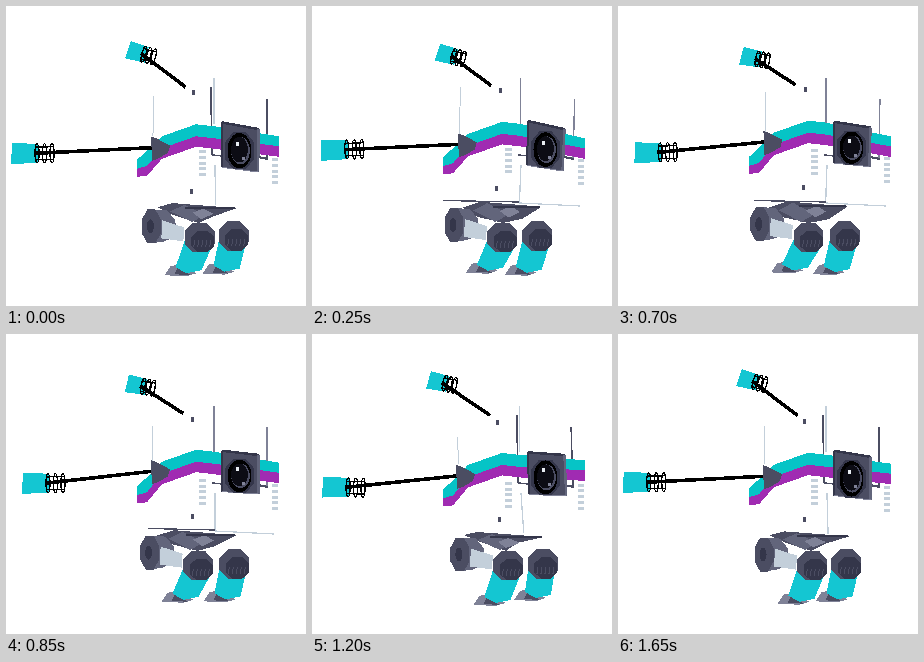
An HTML page for the animation above (1700 ms loop, 300 by 300 pixels).

```html
<!DOCTYPE html>
<html lang="en">
<head>
<meta charset="utf-8">
<title>Walking robot</title>
<style>
html, body { margin: 0; width: 100%; height: 100%; overflow: hidden; background: #fff; }
svg { display: block; width: 100vw; height: 100vh; }
</style>
</head>
<body>
<svg id="stage" viewBox="0 0 300 300" shape-rendering="crispEdges"></svg>
<script>
const LOOP = 1700, STEP = 50;
const CYAN = '#14c6d2', TEAL = '#06c4c6', PURPLE = '#a02bb2', BLACK = '#000';
const DARK = '#34364a', SLATE = '#4b4d62', MID = '#62657b', GREY = '#7f8297', PALE = '#c3cfda';
const stage = document.getElementById('stage');

// The whole robot follows two slow swings; tilt tells how far its underside shows.
let lean = 0, turn = 0, tilt = 0;
const swing = (base, byLean, byTurn = 0) => base + byLean * lean + byTurn * turn;

const shift = (x, y, pts) => pts.map(([a, b]) => [x + a, y + b]);
const poly = (fill, ...pts) => `<polygon fill="${fill}" points="${pts.map(p => p.map(n => n.toFixed(2))).join(' ')}"/>`;
const line = (color, width, a, b) => `<path d="M${a}L${b}" stroke="${color}" stroke-width="${width}"/>`;
const oval = (fill, x, y, rx, ry, more = '') => `<ellipse fill="${fill}" cx="${x}" cy="${y}" rx="${rx}" ry="${ry}" ${more}/>`;
const box = (fill, x, y, w, h) => `<rect fill="${fill}" x="${x}" y="${y}" width="${w}" height="${h}"/>`;

function octagon(fill, x, y, rx, ry) {
  const pts = [];
  for (let i = 0; i < 8; i++) {
    const a = (i + 0.5) * Math.PI / 4;
    pts.push([x + rx * 1.08 * Math.cos(a), y + ry * 1.08 * Math.sin(a)]);
  }
  return poly(fill, ...pts);
}

function arm(x, y, shoulder, angle, back, front, half, gap) {
  let claw = '';
  for (let i = 0; i < 3; i++)
    claw += oval('none', 3 + i * gap, 0, 2, half - 1, `stroke="${BLACK}" stroke-width="1.4"`);
  for (const y of [-0.6, 0.6])
    claw += line(BLACK, 1.2, [1, y * half], [5 + 2 * gap, y * half]);
  return `<g transform="translate(${x} ${y}) rotate(${angle})">`
    + poly(CYAN, [back + 1, -half], [front, 1 - half], [front, half - 1], [back, half]) + claw + '</g>'
    + line(BLACK, 3.6, [x, y], shoulder);
}

function arms() {
  const x = swing(146, 1), y = swing(139.5, -2.5, -2.5);
  return arm(swing(33.5, 0.5, 5.7), swing(148.3, -5.2, 0.5), [x, y], swing(-0.5, -1.5), -23, 4, 10.5, 7.5)
    + arm(swing(134.5, 4.8), swing(49.6, 1, 2.4), [swing(178.5, 0.3, -1.2), swing(80.3, -1.2, -1)],
      swing(13, 1, -2.5), -14, 6, 9, 5)
    + poly(SLATE, ...shift(x, y, [[-1, -11], [5, -9], [18, -2], [16, 5], [6, 11], [0, 13]]));
}

function stripes() {
  const left = swing(153, -2.5, -1), bend = swing(129, -2, -1.5), peak = swing(117, -2, -1.5), right = swing(129.5, 3.2, -0.5);
  const edge = (l, flat, drop, r) => [[131, left + l], [141, left + l - flat], [156, bend + drop],
    [190, peak + drop], [208, peak + drop + 2], [273, right + r]];
  const top = edge(0, 9, 0, 0), mid = edge(9, 3, 12, 10), low = edge(17, 1, 22.5, 20.5);
  return poly(TEAL, ...top, ...[...mid].reverse()) + poly(PURPLE, ...mid, ...low.reverse());
}

function shell() {
  const under = tilt > 0.4;
  const x = swing(208, 0.5), sideX = swing(261, 2), cornerX = swing(209.3, -2.5, -0.5), cornerY = swing(198, -1, -1.5);
  let out = line(PALE, 1, [swing(147, 2), swing(91, -12)], [147, 130])
    + line(under ? GREY : PALE, under ? 1.8 : 1.2, [x, 72], [x, 118])
    + line(PALE, 1.3, [209, 159], [cornerX, cornerY])
    + line(under ? GREY : SLATE, 1.4, [sideX, 93], [261, 152])
    + box(SLATE, swing(185.5, 1.5), swing(83.5, -2.5, -1), 3, 5)
    + box(SLATE, swing(184.5, -1.5), swing(181.5, -2, -1.5), 3, 5);
  if (under) out += line(SLATE, 1.3, [swing(141, -12), 194.5], [cornerX, 196]) + line(PALE, 1.2, [cornerX, 197], [268, 200]);
  else out += line(SLATE, 1.8, [205, 81], [206, 149]);
  for (let i = 0; i < 5; i++)
    out += box(PALE, 193, swing(144.5, -3.5) + i * 5.7, 7, 3) + box(PALE, 266, swing(151.2, 1.5, -1) + i * 5.7, 6, 3);
  return out;
}

function eye() {
  const tl = [216, swing(116.6, -1.8)], tr = [252.5, swing(122, 1, -1)];
  const br = [swing(252.3, -2), swing(163, 1, -3)], bl = [swing(216, -1), swing(159.5, -1, -2)];
  const x = 233.5, y = (tl[1] + tr[1] + br[1] + bl[1]) / 4 + 3, ry = swing(17, 0, -0.8);
  return line(SLATE, 1.5, [206, 149], [216, 150]) + line(SLATE, 2, [252, 151], [262, 153])
    + poly(SLATE, tl, tr, br, bl)
    + line(DARK, 2.5, tl, tr) + line(DARK, 2, tl, bl) + line(MID, 2.5, tr, br) + line(GREY, 1, bl, br)
    + octagon(DARK, x, y, 15, ry + 1) + oval(BLACK, x, y, 12, ry)
    + oval(SLATE, x + 1, y, 9.5, ry - 4) + oval('#0c0c14', x, y - 1, 8.5, ry - 5)
    + box('#e8edf2', x - 4, y - 9, 3, 4) + box(GREY, x + 2, y + 6, 3, 3);
}

function hips() {
  const mix = (x, y, dx, dy) => [x + dx * tilt, y + dy * tilt];
  const x = swing(144.5, -3.5, -1.2), y = swing(219.5, -1, -1);
  return poly(SLATE, mix(152, 201, -2, 1), mix(165, 198, 5, -3), mix(232, 203, -3, -3),
      mix(205, 209, 7, 5), mix(194, 217, -4, 0), mix(166, 207, -1, 5))
    + poly(MID, mix(166, 206, -6, -2), mix(180, 200, -6, -4), mix(200, 209, -4, -1), mix(188, 216, -6, 0))
    + poly(GREY, mix(186, 208, 2, -4), mix(196, 204, 4, -5), mix(208, 209, 0, -4), mix(194, 214, 4, -3))
    + line(DARK, 2, mix(178, 203, 4, -3), mix(230, 203, -2, -3))
    + poly(MID, ...shift(x, y, [[0, -17], [16, -16], [24, -6], [25, 10], [13, 15], [0, 17]]))
    + poly(PALE, ...shift(x, y, [[11, -6], [33, 1], [32, 15], [10, 12]]))
    + octagon(SLATE, x, y, 9.5, 17) + oval(DARK, x - 1, y, 3.5, 7);
}

function leg(kneeX, kneeY, footX, footY) {
  let out = poly(GREY, ...shift(footX, footY, [[0, 0], [6, -9], [15, -11], [32, -2], [22, 1]]))
    + poly(SLATE, ...shift(footX, footY, [[10, -1], [14, -9], [26, 0]]))
    + poly(CYAN, [kneeX - 14, kneeY], [kneeX, kneeY], [kneeX + 11, kneeY + 12],
      [footX + 37, footY - 5], [footX + 22, footY - 2], [footX + 11, footY - 8])
    + octagon(SLATE, kneeX, kneeY, 15, 15) + octagon(DARK, kneeX + 3, kneeY + 4, 11.5, 11);
  for (let i = -2; i < 3; i++)
    out += line(SLATE, 1, [kneeX + 3 + i * 4, kneeY + 3], [kneeX + 2 + i * 4, kneeY + 10]);
  return out;
}

const legs = () => leg(swing(193, -3.5, -1), 231.5, swing(157, -4.5, -2), swing(268.5, -2.5, -1))
  + leg(swing(228, -3), 230, swing(197, -5), swing(267.5, 1.5));

function draw(now) {
  const phase = Math.floor(now % LOOP / STEP) * STEP / LOOP * 360;
  const wave = peak => Math.cos((phase - peak) * Math.PI / 180);
  lean = wave(85);
  turn = wave(165);
  tilt = Math.max(0, swing(0.45, 0.45, 0.2));
  stage.innerHTML = hips() + legs() + shell() + stripes() + arms() + eye();
  requestAnimationFrame(draw);
}
draw(performance.now());
</script>
</body>
</html>
```
